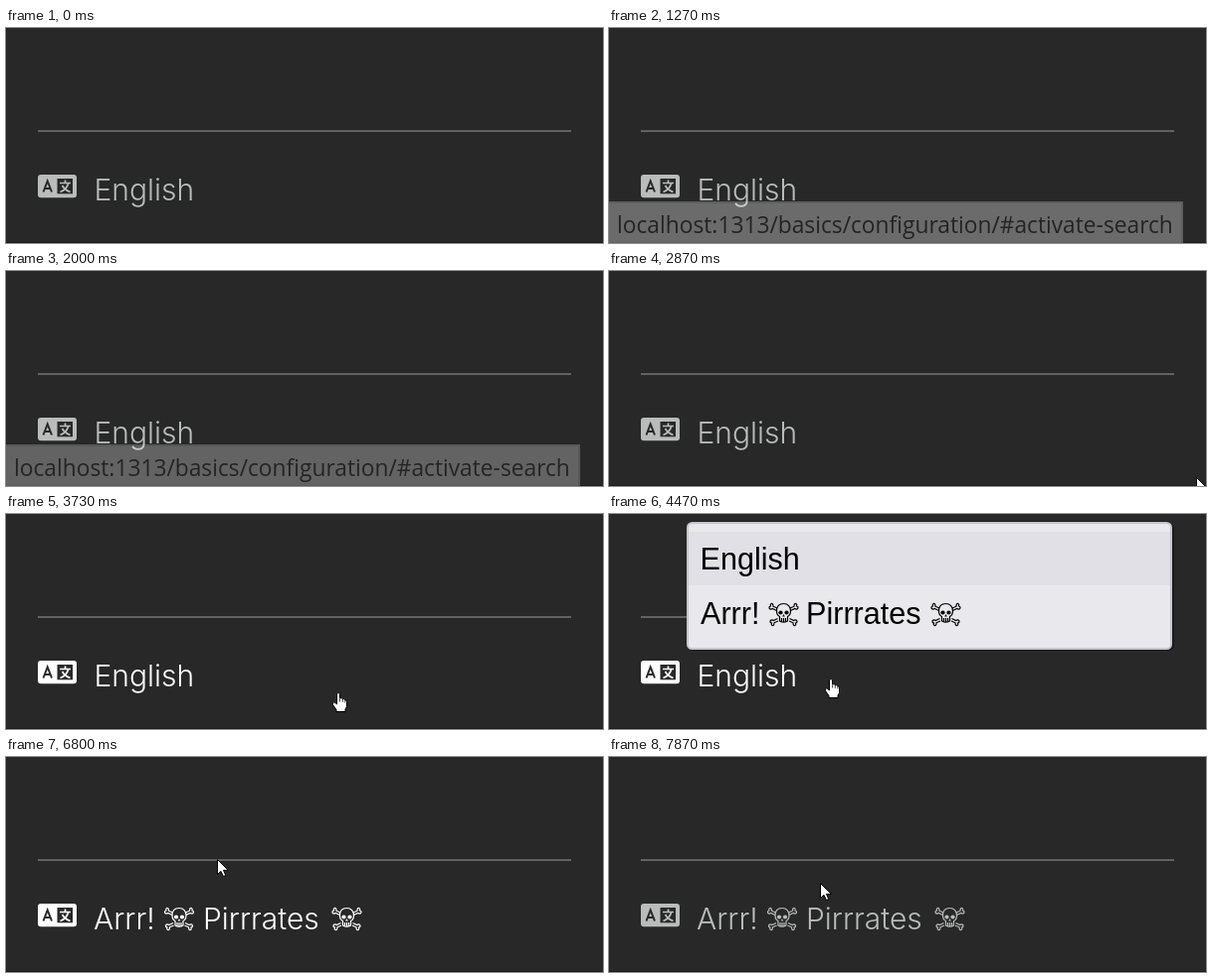
Animation of 600 by 217 pixels, one loop 8000 ms. Source, as an HTML page:

```html
<!DOCTYPE html>
<html lang="en">
<head>
<meta charset="utf-8">
<title>Language switcher</title>
<style>
  html, body { margin: 0; width: 100%; height: 100%; overflow: hidden; background: #282828; }
  svg { display: block; width: 100vw; height: 100vh; }
  #label { color: #b9bcbb; }
  #label.hover { color: #fff; }
  #label text { font: 300 30px Inter, sans-serif; fill: currentColor; }
  #popup text { font: 30.6px "Liberation Sans", Arial, sans-serif; }
  #status text { font: 22.75px "Open Sans", "Noto Sans", sans-serif; fill: #1c1c1c; }
</style>
</head>
<body>
<svg viewBox="0 0 600 217">
  <defs>
    <path id="bone" d="M8.500 6L4.500 4.200Q4.500 1 2.500 1.500 1.300 2 2 4-.2 4.500.800 6.500 2 7.700 3.800 6.500L8 8.500"/>
    <g id="bones">
      <use href="#bone"/>
      <use href="#bone" transform="matrix(1 0 0 -1 1 25)"/>
    </g>
    <g id="skull" fill="none" stroke="currentColor" stroke-width="1.2">
      <use href="#bones"/>
      <use href="#bones" transform="matrix(-1 0 0 1 30 0)"/>
      <path d="M15 1.500C10.500 1.500 8 4.500 8 9c0 3 1 4.500 3 5.500V19q4 2.500 8 0V14.500c2-1 3-2.500 3-5.500 0-4.500-2.500-7.500-7-7.500ZM13 16v3.500M15 16v4M17 16v3.500"/>
      <g fill="currentColor" stroke="none">
        <circle cx="12" cy="10.500" r="2.100"/>
        <circle cx="18" cy="10.500" r="2.100"/>
        <path d="M15 12l1.300 2.500h-2.600Z"/>
      </g>
    </g>
  </defs>

  <rect width="600" height="217" fill="#282828"/>
  <rect y="216" width="600" height="1" fill="#1f1b1b"/>
  <rect x="32" y="103" width="536" height="2" fill="#626262"/>

  <g id="label">
    <rect x="32" y="148" width="39" height="23.300" rx="3" fill="currentColor"/>
    <rect x="51.500" y="152" width="15.500" height="15.300" fill="#282828"/>
    <path d="M37.500 165.500L41.700 154.500 46 165.500M39 162h5.500" fill="none" stroke="#282828" stroke-width="2"/>
    <path d="M54 156.500H65M59.500 153.500V156.500M62.500 157Q61 163 54.500 165.500M56.500 159Q59 163.500 64.500 165.500" fill="none" stroke="currentColor" stroke-width="1.700"/>
    <text id="english" x="88.500" y="174">English</text>
    <g id="pirate">
      <text x="88" y="174">Arrr!</text>
      <text x="198" y="174">Pirrrates</text>
      <use href="#skull" x="159" y="151"/>
      <use href="#skull" x="327.500" y="151"/>
    </g>
  </g>

  <g id="popup" color="#000">
    <rect x="80" y="10" width="488" height="128" rx="5" fill="#1c1c1c"/>
    <rect x="79" y="9" width="486" height="127" rx="4.500" fill="#e9e9ed" stroke="#c6c6cc" stroke-width="2"/>
    <rect id="row" x="80" width="484" height="54" fill="#e0e0e6"/>
    <text x="91.500" y="56">English</text>
    <text x="92" y="111">Arrr!</text>
    <text x="198" y="111">Pirrrates</text>
    <use href="#skull" x="160.500" y="89"/>
    <use href="#skull" x="323.500" y="89"/>
  </g>

  <g id="status">
    <rect y="175" width="577" height="42" fill="#cbcbcb"/>
    <rect y="177" width="575" height="40" fill="#f0f0f0"/>
    <text x="8" y="207">localhost:1313/basics/configuration/#activate-search</text>
  </g>

  <g id="cursor" fill="#fff" stroke="#000">
    <path id="arrow" d="M.5 .5V15.500L4 12.300 6.500 17.500 8.800 16.500 6.500 11.300H11.300Z"/>
    <g id="hand">
      <path d="M-1.500 1.500Q0 -.5 1.500 1.500V6Q3.500 5 4.300 6.800 6.200 6 6.800 7.800 8.500 7.300 8.500 9.500V14.500L7 17V19.500H-2V17.500L-5.500 12.500Q-6 9.500-4 9.800L-1.500 12Z"/>
      <path d="M1.500 6.500V9.500M4.300 7V10M6.800 8V10.500" stroke-width=".7"/>
    </g>
  </g>
</svg>
<script>
const LOOP = 8000, FPS = 15;
const $ = id => document.getElementById(id);
const show = (id, on) => $(id).style.display = on ? "" : "none";

// Keys: [step, value, ...]
const fade = [[18, 0], [21, 1], [27, 1], [28, .88], [31, 0]];
const path = [
  [43, 590, 208], [55, 351, 184], [56, 334, 180], [60, 262, 172], [64, 223, 166],
  [84, 223, 166], [85, 221, 156], [86, 219, 152], [90, 219, 152], [95, 212, 105],
  [96, 212, 105], [97, 212, 103], [114, 212, 103], [118, 212, 127]
];

function at(keys, k) {
  if (k <= keys[0][0]) return keys[0].slice(1);
  const i = keys.findIndex(key => key[0] >= k);
  if (i < 0) return keys[keys.length - 1].slice(1);
  const a = keys[i - 1], b = keys[i], f = (k - a[0]) / (b[0] - a[0]);
  return a.slice(1).map((v, j) => v + (b[j + 1] - v) * f);
}

function draw(now) {
  const k = Math.floor((now % LOOP + 5) * FPS / 1000);
  const [x, y] = at(path, k).map(Math.round);
  const open = k >= 67 && k < 102, chosen = k >= 102;
  const hand = x < 568 && y > 137;

  $("status").setAttribute("opacity", at(fade, k)[0]);
  $("label").classList.toggle("hover", x < 568 && k < 104);
  show("english", !chosen);
  show("pirate", chosen);
  show("popup", open);
  $("row").setAttribute("y", y < 126 ? 72 : 18);
  show("cursor", k >= 43);
  show("hand", hand);
  show("arrow", !hand);
  $("cursor").setAttribute("transform", `translate(${x} ${y})`);
  requestAnimationFrame(draw);
}
requestAnimationFrame(draw);
</script>
</body>
</html>
```
